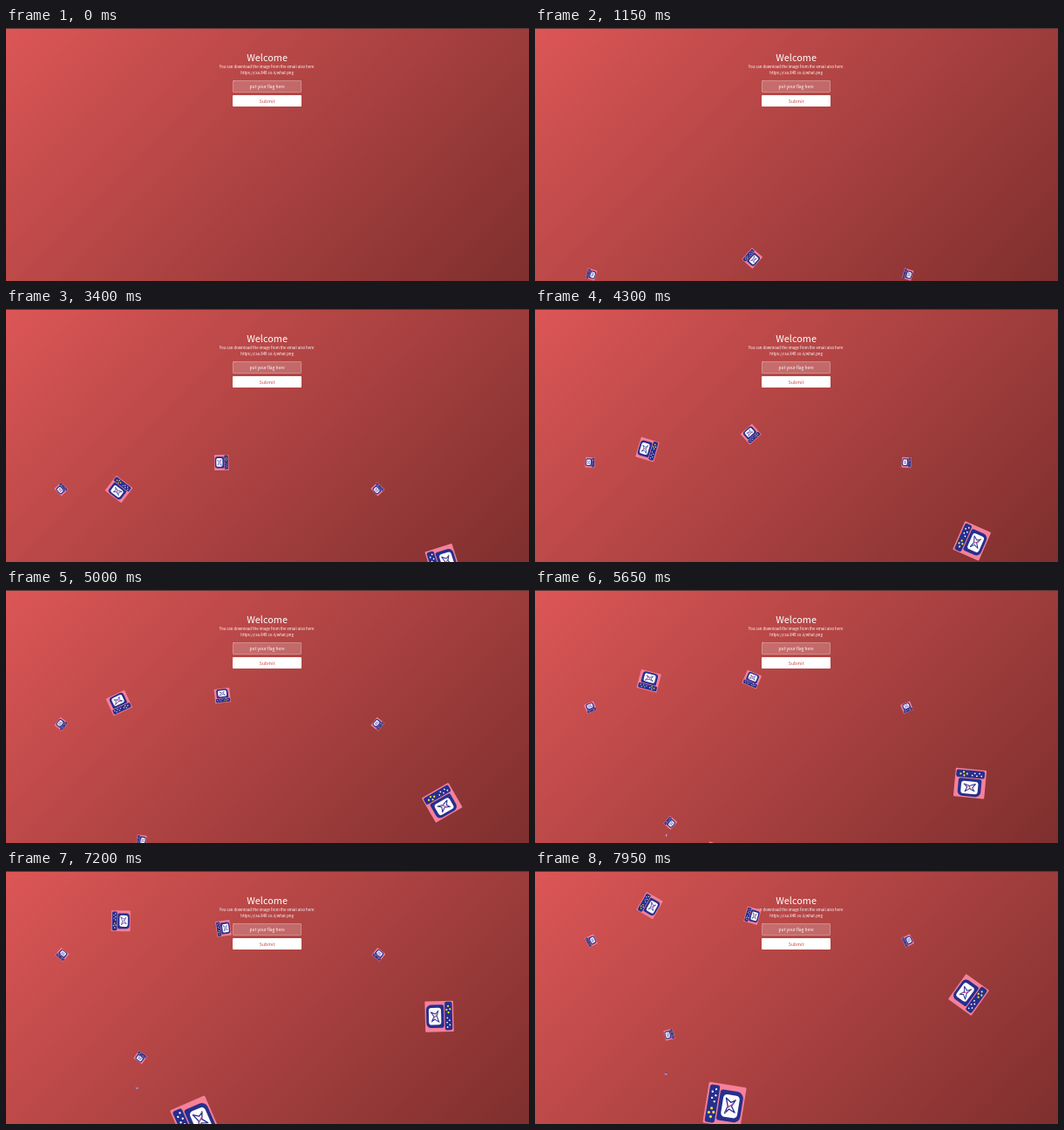
Animation, 600 px wide and 290 px high, one loop 8 s. Source, as an HTML page with a canvas:

```html
<!DOCTYPE html>
<html lang="en">
<head>
<meta charset="utf-8">
<title>Welcome</title>
<style>
  html, body { margin: 0; width: 100%; height: 100%; overflow: hidden; background: #b24444; }
  canvas { display: block; width: 600px; height: 290px; }
</style>
</head>
<body>
<canvas id="stage"></canvas>
<script>
const W = 600, H = 290, LOOP = 8000, STEP = 50;
const canvas = document.getElementById('stage');
const ctx = canvas.getContext('2d');
const ratio = window.devicePixelRatio || 1;
canvas.width = W * ratio;
canvas.height = H * ratio;

const FONT = '"Noto Sans CJK JP", "Noto Sans CJK SC", "Open Sans", sans-serif';
const NAVY = '#262f8c', PINK = '#f5809a', WHITE = '#fdfbff', YELLOW = '#f3e23c';

// Page-to-stage scale, and the run every tile makes in one cycle
const SCALE = 0.2954, PAGE_W = 605, PAGE_X = -2.5;
const FLOOR = 356, RISE = 381, TURN = 600 * Math.PI / 180;

// left: share of the page width; start and time in seconds
const tiles = [
  { left: 0.10, size: 40,  start: -2.5, time: 25 },
  { left: 0.20, size: 80,  start: -0.5, time: 17 },
  { left: 0.25, size: 40,  start: 1.5,  time: 25 },
  { left: 0.40, size: 60,  start: -2.5, time: 22 },
  { left: 0.70, size: 40,  start: -2.5, time: 25 },
  { left: 0.80, size: 120, start: 0.5,  time: 25 },
  { left: 0.32, size: 160, start: 4.45, time: 25 },
  { left: 0.25, size: 10,  start: -0.5, time: 40 }
];

// cubic-bezier(.25, .1, .25, 1)
function ease(x) {
  let lo = 0, hi = 1;
  for (let i = 0; i < 30; i++) {
    const u = (lo + hi) / 2;
    if (0.75 * u * (1 - u) + u ** 3 < x) lo = u; else hi = u;
  }
  const u = lo, v = 1 - u;
  return 0.3 * v * v * u + 3 * v * u * u + u ** 3;
}

function box(x, y, w, h, r, fill) {
  ctx.beginPath();
  ctx.roundRect(x, y, w, h, r);
  ctx.fillStyle = fill;
  ctx.fill();
}

function line(points, color, width) {
  ctx.beginPath();
  points.forEach(([x, y], i) => i ? ctx.lineTo(x, y) : ctx.moveTo(x, y));
  ctx.strokeStyle = color;
  ctx.lineWidth = width;
  ctx.stroke();
}

function dots(points, color, r) {
  ctx.fillStyle = color;
  for (const [x, y] of points) {
    ctx.beginPath();
    ctx.arc(x, y, r, 0, 2 * Math.PI);
    ctx.fill();
  }
}

function text(str, y, size, color, weight = 400) {
  ctx.font = `${weight} ${size}px ${FONT}`;
  ctx.fillStyle = color;
  ctx.fillText(str, W / 2 - 0.4, y);
}

// Hand-drawn computer on a pink card, one unit wide
function drawCard() {
  box(-0.5, -0.52, 1, 0.92, 0.03, PINK);
  box(-0.37, -0.48, 0.75, 0.57, [0.16, 0.16, 0.06, 0.06], NAVY);
  box(-0.27, -0.40, 0.55, 0.40, 0.09, WHITE);
  line([[-0.18, -0.07], [-0.09, -0.2], [-0.15, -0.3], [0, -0.23], [0.14, -0.33],
        [0.08, -0.18], [0.19, -0.09], [0.01, -0.14], [-0.18, -0.07]], NAVY, 0.028);
  line([[-0.06, -0.26], [0.05, -0.13]], '#b34a9a', 0.03);
  dots([[-0.16, -0.3], [0.16, -0.1]], '#777a52', 0.022);
  box(-0.45, 0.12, 0.92, 0.24, 0.06, NAVY);
  dots([[-0.35, 0.2], [-0.28, 0.28], [-0.2, 0.19], [-0.13, 0.27], [-0.05, 0.2]], WHITE, 0.025);
  dots([[0.12, 0.24], [0.21, 0.18], [0.23, 0.29], [0.33, 0.23]], YELLOW, 0.032);
}

function drawTile({ left, size, start, time }, t) {
  if (t < start) return;
  const w = size * SCALE;
  const p = ease((t - start) / time);
  ctx.save();
  ctx.translate(PAGE_X + left * PAGE_W + w / 2, FLOOR - 0.53 * w - RISE * p);
  ctx.rotate(TURN * p);
  ctx.scale(w, w);
  drawCard();
  ctx.restore();
}

function drawBackground() {
  // 135 degree gradient running corner to corner
  const d = (W + H) / 4;
  const g = ctx.createLinearGradient(W / 2 - d, H / 2 - d, W / 2 + d, H / 2 + d);
  g.addColorStop(0, '#dc5656');
  g.addColorStop(1, '#7e2f2e');
  ctx.fillStyle = g;
  ctx.fillRect(0, 0, W, H);
  ctx.fillStyle = '#5a3535';
  ctx.fillRect(0, 0, W, 1);
}

function drawForm() {
  box(260, 60, 79, 14, 1, 'rgba(255,255,255,0.2)');
  ctx.strokeStyle = 'rgba(255,255,255,0.35)';
  ctx.lineWidth = 0.7;
  ctx.beginPath();
  ctx.roundRect(260.4, 60.4, 78.2, 13.2, 1);
  ctx.stroke();
  text('put your flag here', 68.9, 4.9, '#fff');
  box(260, 77, 79, 13, 1, '#fff');
  text('Submit', 85.5, 5.15, '#c9483f');
}

function draw(ms) {
  const t = Math.floor(ms % LOOP / STEP) * STEP / 1000;
  ctx.setTransform(ratio, 0, 0, ratio, 0, 0);
  ctx.textAlign = 'center';
  ctx.textBaseline = 'alphabetic';
  ctx.lineJoin = ctx.lineCap = 'round';
  drawBackground();
  text('Welcome', 38.2, 10.9, '#fff', 200);
  text('You can download the image from the email also here:', 46.4, 4.36, '#fff');
  text('https://csa.840.co.il/what.png', 53, 4.36, '#fff');
  for (const tile of tiles) drawTile(tile, t);
  drawForm();
}

const begin = performance.now();
function tick() {
  draw(performance.now() - begin);
  requestAnimationFrame(tick);
}
tick();
</script>
</body>
</html>
```
